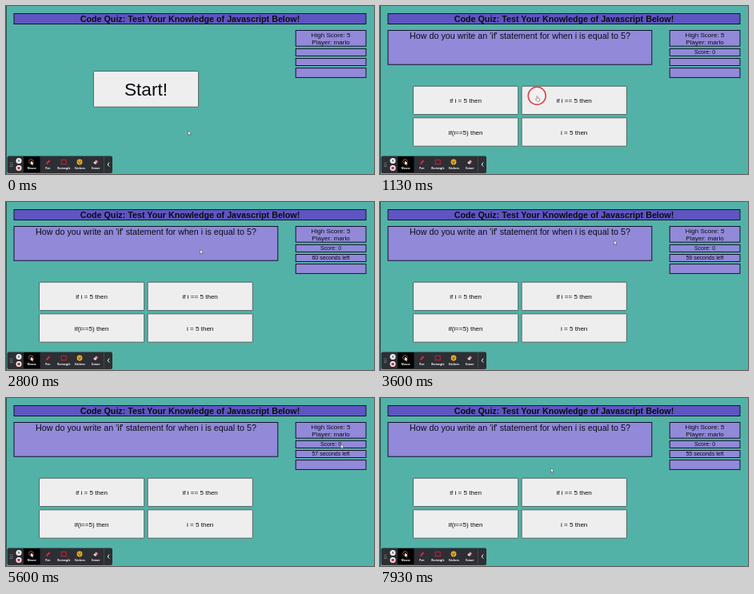
Animation, 460 px wide and 210 px high, one loop 8 s. Source, as an HTML page:

```html
<!DOCTYPE html>
<html lang="en">
<head>
<meta charset="utf-8">
<title>Code Quiz</title>
<style>
  html, body { margin: 0; width: 100%; height: 100%; overflow: hidden; background: #53b2a7; }
  svg { display: block; width: 100vw; height: 100vh; }
  text { font-family: "Liberation Sans", Arial, sans-serif; text-anchor: middle; fill: #0b0b12; }
  .panel { fill: #9289d9; stroke: #15132e; stroke-width: 1; }
  .button { fill: #eeeeee; stroke: #4d5857; stroke-width: .9; }
  .title { font-size: 10.72px; font-weight: bold; }
  .question { font-size: 10.72px; }
  .label { font-size: 8.05px; }
  .small { font-size: 7px; }
  .start { font-size: 22.6px; }
  .tool { font-family: "Open Sans", "Noto Sans", sans-serif; font-size: 3.3px; font-weight: bold; fill: #fff; }
</style>
</head>
<body>
<svg viewBox="0 0 460 210" preserveAspectRatio="none">
  <rect width="460" height="210" fill="#53b2a7"/>
  <rect width=".7" height="210" fill="#17302e"/>

  <rect class="panel" x="10" y="9.5" width="440" height="13" style="fill:#5f55c2"/>
  <text class="title" x="230" y="19.8">Code Quiz: Test Your Knowledge of Javascript Below!</text>

  <rect class="panel" x="362.2" y="30.5" width="87.8" height="19.7"/>
  <rect class="panel" x="362.2" y="53.4" width="87.8" height="9"/>
  <rect class="panel" x="362.2" y="65.5" width="87.8" height="9"/>
  <rect class="panel" x="362.2" y="77.6" width="87.8" height="11.8"/>
  <text class="label" x="406" y="38.6">High Score: 5</text>
  <text class="label" x="406" y="47.7">Player: marlo</text>

  <g id="intro">
    <rect class="button" x="109.4" y="81.4" width="131.2" height="44.8" rx=".8"/>
    <text class="start" x="175" y="111.6">Start!</text>
  </g>

  <g id="quiz">
    <rect class="panel" x="10" y="30.5" width="329.8" height="42.7"/>
    <text class="question" x="175" y="40.8">How do you write an 'if' statement for when i is equal to 5?</text>
    <text class="small" x="406" y="60.4">Score: 0</text>
    <text class="small" x="406" y="72.4" id="timer"></text>
    <g id="answers"></g>
  </g>

  <g id="toolbar">
    <rect x="1.5" y="187.5" width="131.5" height="21.5" rx="2" fill="#2d2f34"/>
    <rect x="22" y="188" width="20.5" height="20" rx="1" fill="#020203"/>
    <path d="M122.5 188v20.5" stroke="#55585e" stroke-width=".6"/>
    <g id="grip" fill="#a9abb0"></g>
    <circle cx="16" cy="193.4" r="3.5" fill="#f4f4f4"/>
    <path d="M14.7 192.1l2.6 2.6m0-2.6l-2.6 2.6" stroke="#333" stroke-width=".8"/>
    <circle cx="16" cy="202.6" r="3.5" fill="#f4f4f4"/>
    <rect x="14.3" y="200.9" width="3.4" height="3.4" rx=".6" fill="#d8283c"/>
    <circle cx="31.3" cy="194.4" r="2.7" fill="none" stroke="#dd6a52" stroke-width=".8"/>
    <path d="M31 193.5v5l1.2-1 .9 1.7 .9-.5-.8-1.6 1.6-.2z" fill="#fff"/>
    <path d="M50 197.9l.5-2 3.2-3.5 1.5 1.4-3.2 3.5z" fill="#e02b43"/>
    <rect x="69.2" y="192.3" width="6" height="5.4" fill="none" stroke="#d3213a" stroke-width=".9"/>
    <circle cx="92" cy="195" r="3.4" fill="#f3b72c"/>
    <path d="M89.9 194h1.5m1.2 0h1.5" stroke="#4a3010" stroke-width=".9"/>
    <path d="M90.2 195.6a1.9 1.9 0 0 0 3.6 0z" fill="#6b3a12"/>
    <path d="M109.3 196l3.2-3.4 2.6 1.6-3.1 3.5z" fill="#ee8c9b"/>
    <path d="M109.3 196l1.1-1.2 2.7 1.6-1.1 1.3z" fill="#f5dfe2"/>
    <path d="M129.2 195.6l-2.1 2.5 2.1 2.5" fill="none" stroke="#fff" stroke-width="1"/>
  </g>

  <circle id="ring" cx="196.2" cy="112.3" fill="#f7f3f3" fill-opacity=".65" stroke="#dc3f52" stroke-width="1.5"/>
  <path id="arrow" d="M0 0v5.4l1.3-1.1 .9 1.9 .9-.4-.8-1.9 1.7-.2z" fill="#fff" stroke="#26302f" stroke-width=".45"/>
  <path id="hand" d="M-.5 .3q.5-.6 1 0v2.3l2 .5q.8.2.7 1l-.4 2.5h-3.1l-2-2.6q.1-.8.9-.4l.9.6z" fill="#fff" stroke="#4a4a4a" stroke-width=".5"/>
</svg>
<script>
const LOOP = 8000;
const CLICK = 1000;
const QUIZ = 1060;
const FIRST_TICK = 2125;

const $ = id => document.getElementById(id);

function add(parent, tag, attrs, text) {
  const el = document.createElementNS("http://www.w3.org/2000/svg", tag);
  for (const key in attrs) el.setAttribute(key, attrs[key]);
  if (text) el.textContent = text;
  parent.append(el);
}

const startBox = { x: 109.4, y: 81.4, width: 131.2, height: 44.8 };
const answerBoxes = ["if i = 5 then", "if i == 5 then", "if(i==5) then", "i = 5 then"].map((text, i) => {
  const box = { x: 41.5 + (i % 2) * 135.6, y: 100.2 + (i >> 1) * 39.6, width: 131.2, height: 35.4 };
  add($("answers"), "rect", { ...box, rx: .8, class: "button" });
  add($("answers"), "text", { x: box.x + 65.6, y: box.y + 20.7, class: "label" }, text);
  return box;
});

["Mouse", "Pen", "Rectangle", "Stickers", "Eraser"].forEach((name, i) =>
  add($("toolbar"), "text", { x: 32.3 + i * 20, y: 203.8, class: "tool" }, name));

for (let i = 0; i < 6; i++)
  add($("grip"), "circle", { cx: 5.7 + (i % 2) * 2, cy: 196 + (i >> 1) * 2.2, r: .55 });

// time, x, y of the pointer tip
const path = [
  [200, 227.5, 156], [800, 196.5, 112.5],
  [2200, 196.5, 112.5], [2660, 240, 60],
  [2730, 240, 60], [3260, 292.5, 48],
  [3600, 292.5, 48], [4000, 425, 36],
  [4200, 425, 36], [4460, 433, 43],
  [4600, 433, 43], [4730, 434.5, 39.5],
  [5130, 434.5, 39.5], [5500, 420, 56], [5930, 410, 68],
  [6000, 410, 68], [6260, 382.5, 82.5],
  [6360, 382.5, 82.5], [6800, 213.5, 87.5]
];

const clamp = v => Math.max(0, Math.min(1, v));
const ease = v => v * v * (3 - 2 * v);

function pointerAt(t) {
  const next = path.findIndex(p => p[0] > t);
  if (next === 0) return path[0].slice(1);
  if (next < 0) return path[path.length - 1].slice(1);
  const a = path[next - 1], b = path[next];
  const k = ease((t - a[0]) / (b[0] - a[0]));
  return [a[1] + (b[1] - a[1]) * k, a[2] + (b[2] - a[2]) * k];
}

const inside = (x, y) => b => x > b.x && x < b.x + b.width && y > b.y && y < b.y + b.height;
const show = (id, on) => { $(id).style.display = on ? "" : "none"; };

function draw(t) {
  const playing = t >= QUIZ;
  show("intro", !playing);
  show("quiz", playing);
  $("timer").textContent = t < FIRST_TICK ? "" : 60 - Math.floor((t - FIRST_TICK) / 1000) + " seconds left";

  const [x, y] = pointerAt(t);
  const over = (playing ? answerBoxes : [startBox]).some(inside(x, y));
  show("hand", over);
  show("arrow", !over);
  $(over ? "hand" : "arrow").setAttribute("transform", `translate(${x} ${y})`);

  show("ring", t >= CLICK && t < 1450);
  $("ring").setAttribute("r", 11 * clamp((t - CLICK) / 120));
  $("ring").setAttribute("opacity", 1 - clamp((t - 1200) / 250));
}

const begin = performance.now();
function frame() {
  draw((performance.now() - begin) % LOOP);
  requestAnimationFrame(frame);
}
frame();
</script>
</body>
</html>
```
